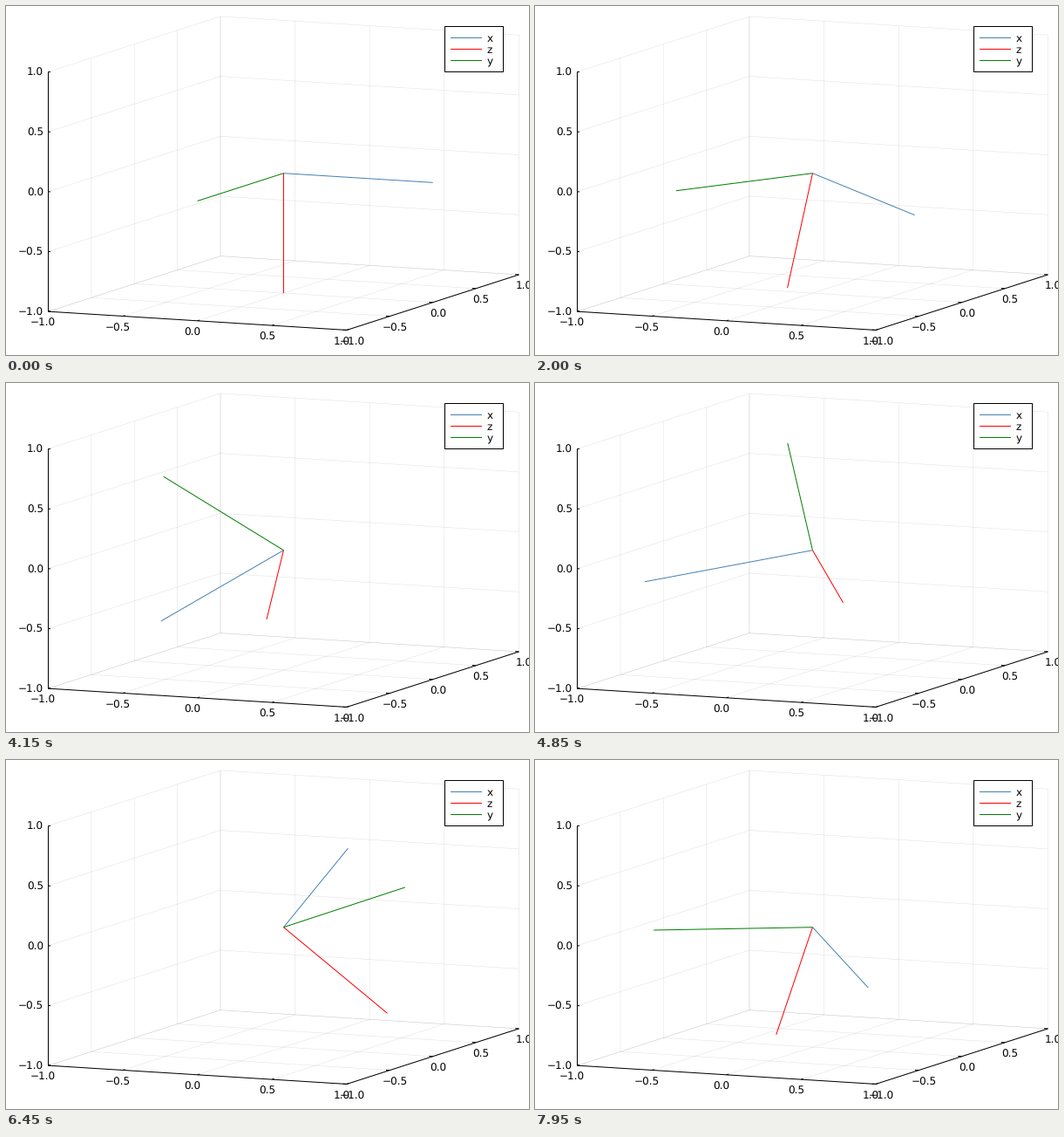
Animation of 600 by 400 pixels, one loop 8 s. Source, as a matplotlib script:

```python
import numpy as np
import matplotlib.pyplot as plt
from matplotlib.animation import FuncAnimation
from matplotlib.patches import Rectangle

W, H, DPI = 600, 400, 100
PX = 72 / DPI
FRAMES, STEP = 160, 50

# Parallel projection: stage vectors of the unit axes, y pointing down
CENTRE = np.array([318.45, 191.7])
BASIS = np.array([[171.2, 10.65], [98.75, -31.75], [0, -137.35]])
TICKS = (-1, -0.5, 0, 0.5, 1)

# Spin from rest about a fixed axis
AXIS = np.array([0, 1, -2]) / np.sqrt(5)
ACCEL = np.sqrt(0.05)
LAG = 0.03

ARMS = [("x", "steelblue", (1, 0, 0)),
        ("z", "red", (0, 0, -1)),
        ("y", "green", (0, -1, 0))]

plt.rcParams["text.hinting"] = "none"
fig = plt.figure(figsize=(W / DPI, H / DPI), dpi=DPI, facecolor="white")
ax = fig.add_axes([0, 0, 1, 1])
ax.set_xlim(0, W)
ax.set_ylim(H, 0)
ax.axis("off")


def project(*p):
    return CENTRE + np.array(p) @ BASIS


def segment(a, b, color="black", width=1.0, **kw):
    return ax.plot([a[0], b[0]], [a[1], b[1]], color=color, lw=width * PX,
                   solid_capstyle="butt", snap=False, **kw)[0]


def edge(p, q, **kw):
    return segment(project(*p), project(*q), **kw)


def label(x, y, s, ha="center"):
    ax.text(x, y, s, ha=ha, va="center_baseline", fontsize=12 * PX,
            family="DejaVu Sans", zorder=6)


def draw_grid():
    style = dict(alpha=0.1, width=0.6, zorder=1)
    for t in TICKS:
        edge((t, -1, -1), (t, 1, -1), **style)
        edge((t, 1, -1), (t, 1, 1), **style)
        edge((-1, t, -1), (1, t, -1), **style)
        edge((-1, t, -1), (-1, t, 1), **style)
        edge((-1, -1, t), (-1, 1, t), **style)
        edge((-1, 1, t), (1, 1, t), **style)


def draw_axes():
    edge((-1, -1, -1), (1, -1, -1), zorder=2)
    edge((1, -1, -1), (1, 1, -1), zorder=2)
    edge((-1, -1, -1), (-1, -1, 1), zorder=2)
    for t in TICKS:
        name = f"{t:.1f}".replace("-", "\u2212")
        edge((t, -1, -1), (t, -0.975, -1), zorder=2)
        edge((1, t, -1), (0.975, t, -1), zorder=2)
        edge((-1, -1, t), (-0.985, -1, t), zorder=2)
        x, y = project(t, -1, -1)
        label(x - 6, y + 12.5, name)
        x, y = project(1, t, -1)
        label(x + 6, y + 12.5, name)
        x, y = project(-1, -1, t)
        label(x - 5.5, y, name, "right")


def draw_legend():
    ax.add_patch(Rectangle((503.5, 23.5), 67, 52, fc="white", ec="black",
                           lw=PX, snap=False, zorder=4))
    for i, (name, color, _) in enumerate(ARMS):
        y = 36.5 + 13 * i
        segment((510, y), (546, y), color, zorder=5)
        label(551.5, y, name, "left")


def spin(v, angle):
    v = np.array(v, float)
    along = AXIS * (AXIS @ v)
    return along + (v - along) * np.cos(angle) + np.cross(AXIS, v) * np.sin(angle)


def update(k):
    t = k * STEP / 1000
    angle = ACCEL / 2 * t * max(0, t - LAG)
    for line, (_, _, v) in zip(lines, ARMS):
        tip = project(*spin(v, angle))
        line.set_data([CENTRE[0], tip[0]], [CENTRE[1], tip[1]])
    return lines


draw_grid()
draw_axes()
draw_legend()
lines = [segment(CENTRE, CENTRE, color, zorder=3) for _, color, _ in ARMS]

anim = FuncAnimation(fig, update, frames=FRAMES, interval=STEP,
                     repeat=True, repeat_delay=0, blit=False)
plt.show()
```
